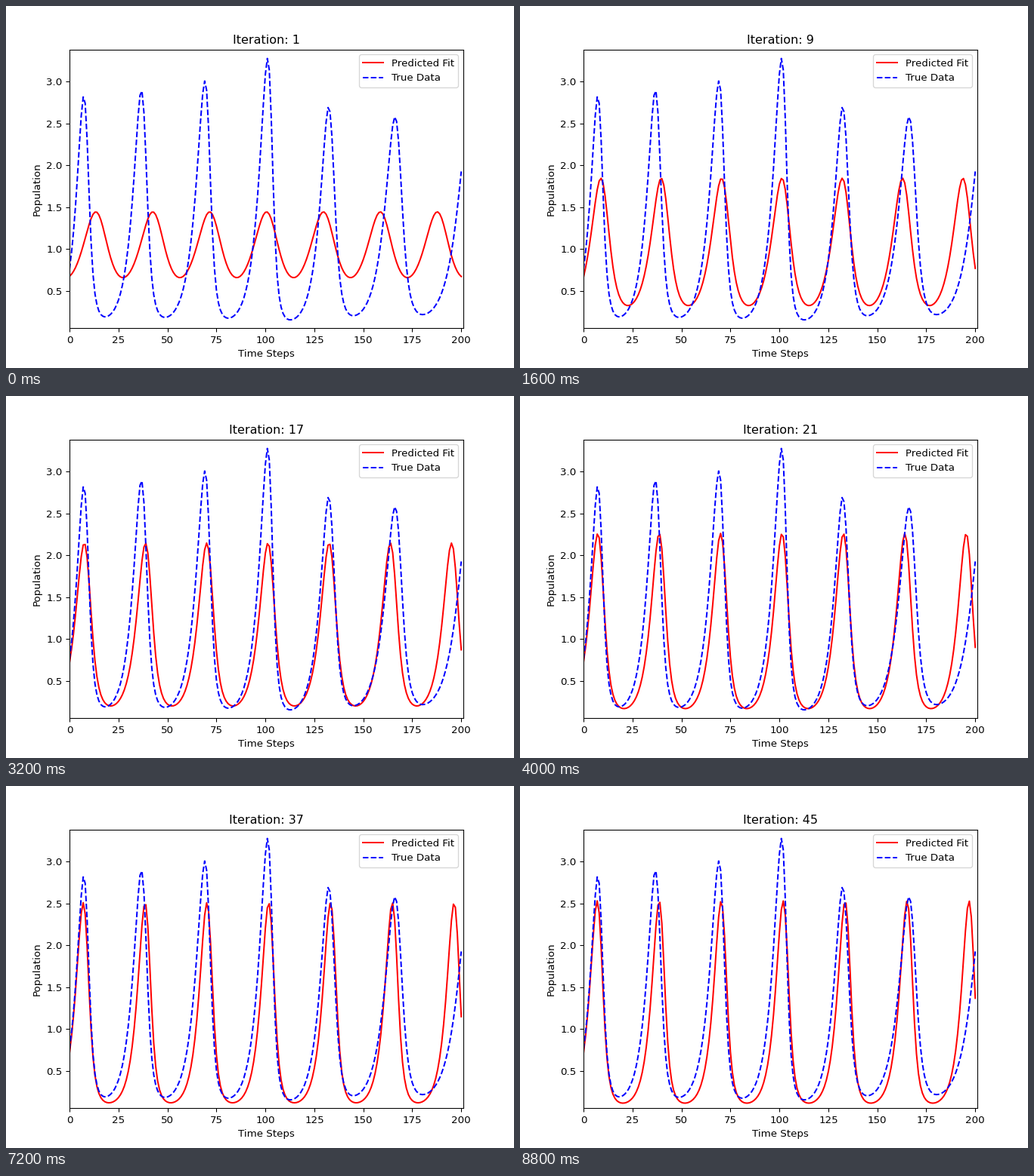
These frames come from a looping animation (672x480 px, 9000 ms). A matplotlib script:

```python
import math

import numpy as np
import matplotlib.pyplot as plt
from matplotlib.animation import FuncAnimation

FRAMES, INTERVAL = 45, 200
steps = np.arange(201)


def orbit(high, mean, ratio, dt=0.02):
    """One predator-prey cycle of the prey, from peak to peak.

    Returns times, values, time of the minimum and the period.
    """
    grow, die = math.sqrt(ratio), 1 / math.sqrt(ratio)

    def rate(u, v):
        return grow * (1 - math.exp(v)), die * (math.exp(u) - 1)

    u, v, t = math.log(high / mean), 0.0, 0.0
    times, logs = [t], [u]
    t_low = None
    while True:
        a = rate(u, v)
        b = rate(u + dt / 2 * a[0], v + dt / 2 * a[1])
        c = rate(u + dt / 2 * b[0], v + dt / 2 * b[1])
        d = rate(u + dt * c[0], v + dt * c[1])
        last = v
        u += dt / 6 * (a[0] + 2 * b[0] + 2 * c[0] + d[0])
        v += dt / 6 * (a[1] + 2 * b[1] + 2 * c[1] + d[1])
        if t_low is None and v < 0:
            t_low = t + dt * last / (last - v)
        elif t_low is not None and v >= 0:
            period = t + dt * last / (last - v)
            times.append(period)
            logs.append(logs[0])
            return np.array(times), mean * np.exp(logs), t_low, period
        t += dt
        times.append(t)
        logs.append(u)


# Peaks (time, population) of the noisy data
PEAKS = [(-18.4, 2.7), (7.3, 2.83), (36.7, 2.9), (69.2, 3.01), (101.2, 3.28),
         (132.3, 2.7), (166.2, 2.58), (204.1, 2.6)]


def true_data():
    y = np.zeros(len(steps))
    for (t0, high0), (t1, high1) in zip(PEAKS, PEAKS[1:]):
        # The higher a peak, the deeper the dip after it
        low = 0.178 * (3 / high0) ** 1.4
        dip = t0 + 0.37 * (t1 - t0)
        for start, end, high in (t0, dip, high0), (dip, t1, high1):
            mean = (high - low) / math.log(high / low)
            times, values, t_low, period = orbit(high, mean, 1.5)
            span = (0, t_low) if start == t0 else (t_low, period)
            part = (steps >= start) & (steps < end)
            y[part] = np.interp(np.interp(steps[part], (start, end), span),
                                times, values)
    return y


def prediction(i):
    """Fitted curve after i updates: each parameter eases to its final value."""
    high = 2.53 - 1.085 * (1 - i / (FRAMES - 1)) ** 2.3
    mean = 0.785 + 0.217 * math.exp(-0.106 * i)
    first = 7 + 6.45 * math.exp(-0.155 * i)
    length = 31.2 + 0.01 * i - 2.15 * math.exp(-0.19 * i)
    times, values, _, period = orbit(high, mean, 3)
    return np.interp((steps - first) / length % 1 * period, times, values)


fig, ax = plt.subplots(figsize=(7, 5), dpi=96)
fit, = ax.plot(steps, prediction(0), "r-", label="Predicted Fit")
ax.plot(steps, true_data(), "b--", label="True Data")
ax.set_xlim(0, 201)
ax.set_ylim(0.058, 3.381)
ax.set_xlabel("Time Steps")
ax.set_ylabel("Population")
title = ax.set_title("Iteration: 1")
ax.legend(loc="upper right")


def update(i):
    fit.set_ydata(prediction(i))
    title.set_text(f"Iteration: {i + 1}")
    return fit, title


anim = FuncAnimation(fig, update, frames=FRAMES, interval=INTERVAL,
                     repeat=True, repeat_delay=0)
plt.show()
```
